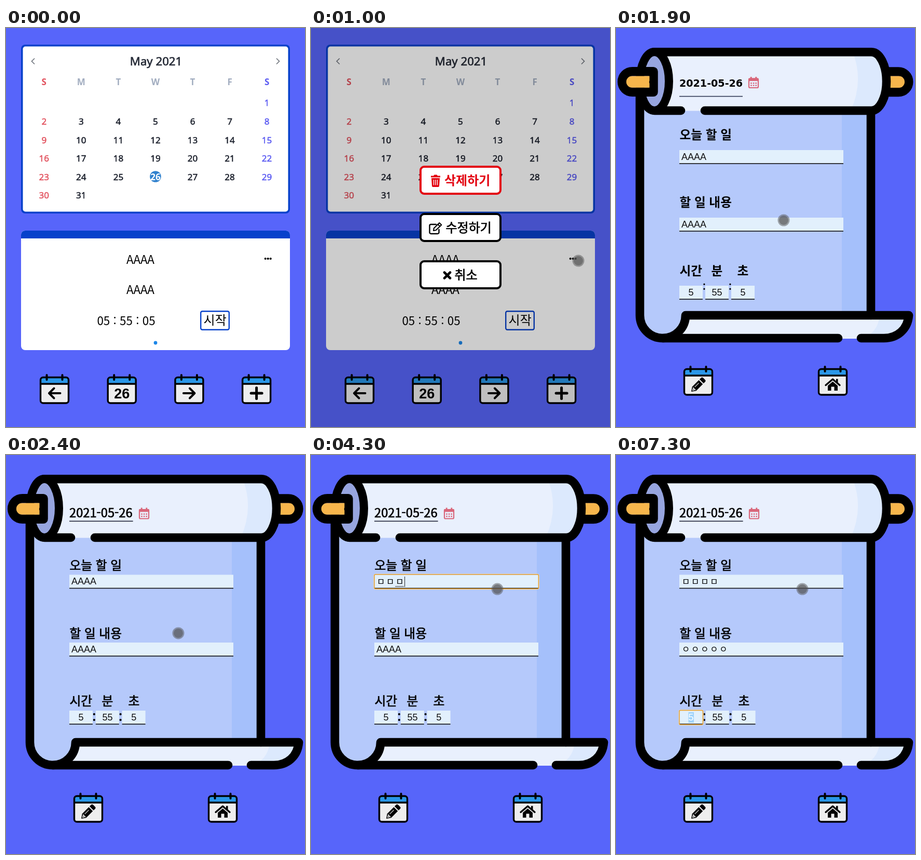
Animation, 576 px wide and 768 px high, one loop 8000 ms. Source, as an HTML page:

```html
<!DOCTYPE html>
<html lang="ko">
<head>
<meta charset="utf-8">
<title>Planner</title>
<style>
  html, body { margin: 0; width: 100%; height: 100%; overflow: hidden; background: #5765fa; }
  svg { display: block; width: 100vw; height: 100vh; }
  text { white-space: pre; }
  .cjk, .jamo { font-family: "Noto Sans CJK KR", "Noto Sans KR", "Noto Sans CJK JP", sans-serif; }
  .jamo { letter-spacing: 2.8px; }
  .cal { font-family: "Noto Sans", "Open Sans", sans-serif; }
  .input { font-family: "Liberation Sans", Arial, sans-serif; }
  .dejavu { font-family: "DejaVu Sans", sans-serif; }
</style>
</head>
<body>
<svg id="stage" viewBox="0 0 576 768">
  <g id="home"></g>
  <g id="modal"></g>
  <g id="edit">
    <g id="scroll"></g>
    <g id="form"></g>
  </g>
  <g id="pointer">
    <circle r="11.5" fill="#555" fill-opacity=".5"/>
    <circle r="9" fill="#505050" fill-opacity=".5"/>
  </g>
  <g id="mover">
    <path d="M-4 0H4M0 -4V4" stroke="#fff" stroke-width="5"/>
    <path d="M0 -8l3.5 4h-7zM0 8l3.5 -4h-7zM-8 0l4 -3.5v7zM8 0l-4 -3.5v7z" stroke="#fff" stroke-width="1.6" paint-order="stroke"/>
    <path d="M-5 0H5M0 -5V5" stroke="#000" stroke-width="2"/>
  </g>
</svg>
<script>
const LOOP = 8000;
const BLUE = '#0741cb';
const $ = id => document.getElementById(id);

// Medium weight is regular thickened by a fine outline.
const text = (s, x, y, size, { fill = '#000', weight = 400, font = 'cjk', anchor = 'start' } = {}) => {
  const medium = weight === 500;
  const outline = medium ? `stroke="${fill}" stroke-width="${size * 0.03}"` : '';
  return `<text class="${font}" x="${x}" y="${y}" font-size="${size}" font-weight="${medium ? 400 : weight}" fill="${fill}" text-anchor="${anchor}" ${outline}>${s}</text>`;
};
const rect = (x, y, w, h, fill, rx = 0, more = '') =>
  `<rect x="${x}" y="${y}" width="${w}" height="${h}" rx="${rx}" fill="${fill}" ${more}/>`;
const line = (d, width, color = '#000', more = '') =>
  `<path d="${d}" fill="none" stroke="${color}" stroke-width="${width}" ${more}/>`;
const shape = (d, fill) => `<path d="${d}" fill="${fill}"/>`;
const dot = (x, y, r, fill) => `<circle cx="${x}" cy="${y}" r="${r}" fill="${fill}"/>`;
const round = 'stroke-linecap="round" stroke-linejoin="round"';

// Calendar-shaped button; (0,0) is the top centre.
const calendarButton = (x, y, symbol) => `<g transform="translate(${x} ${y})">
  ${rect(-27, 6.5, 54, 49.5, '#eee', 5)}
  ${shape('M-27 19V11a5 5 0 0 1 5 -5H22a5 5 0 0 1 5 5V19z', '#2a97e8')}
  ${line('M-27 19H27', 3.4)}
  ${rect(-27, 6.5, 54, 49.5, 'none', 5, 'stroke="#000" stroke-width="3.4"')}
  ${line('M-15 2V11M15 2V11', 4, '#000', 'stroke-linecap="round"')}
  ${symbol}</g>`;

const icons = {
  left: line('M11 37H-10M-1 27.5L-10.5 37L-1 46.5', 4, '#000', round),
  right: line('M-11 37H10M1 27.5L10.5 37L1 46.5', 4, '#000', round),
  plus: line('M-10.5 37H10.5M0 26.5V47.5', 5, '#000', round),
  today: text('26', 0, 47, 27, { weight: 700, font: 'input', anchor: 'middle' }),
  pencil: `<g transform="translate(-13.5 50) rotate(-45)">
    ${shape('M0 0L8 -5.5H26V5.5H8z', '#000')}${shape('M28 -5.5H32a3 3 0 0 1 3 3V2.5a3 3 0 0 1 -3 3H28z', '#000')}
    ${line('M11 -1.5H22', 1.2, '#eee')}${line('M4 0L8 -2.4V2.4z', 1.5, '#eee')}</g>`,
  house: line('M-13.5 37.5L0 26L13.5 37.5', 3.4, '#000', round) +
    shape('M0 30.5L9.5 38.5V48H3V40.5H-3V48H-9.5V38.5z', '#000') + rect(6.5, 25.5, 3.5, 8, '#000')
};

function drawHome() {
  const colX = col => 73.3 + col * 71.55;
  const colColor = (col, plain) => col === 0 ? '#e2525e' : col === 6 ? '#5c5cf2' : plain;
  let out = rect(0, 0, 576, 768, '#5765fa') +
    rect(29, 32, 518, 325, BLUE, 8) + rect(32.5, 35.5, 511, 318, '#fff', 5) +
    line('M55 58.5L49.5 64L55 69.5M521 58.5L526.5 64L521 69.5', 1.7, '#70757d') +
    text('May 2021', 289, 72, 22.2, { fill: '#252a36', weight: 500, font: 'cal', anchor: 'middle' });

  [...'SMTWTFS'].forEach((name, col) => {
    out += text(name, colX(col), 109.7, 17, { fill: colColor(col, '#a2adc0'), weight: 700, font: 'cal', anchor: 'middle' });
  });
  for (let day = 1; day <= 31; day++) {
    const col = (day + 5) % 7, row = Math.floor((day + 5) / 7);
    const y = 150.4 + row * 35.55, today = day === 26;
    if (today) out += dot(colX(col), 286, 10.8, '#3182ce');
    out += text(day, colX(col), y, 17, {
      fill: today ? '#fff' : colColor(col, '#1a1f2b'), weight: today ? 700 : 500, font: 'cal', anchor: 'middle'
    });
  }

  out += rect(29, 390, 518, 230, '#fff', 8) +
    shape('M29 405V398a8 8 0 0 1 8 -8H539a8 8 0 0 1 8 8V405z', BLUE) +
    [454, 512].map(y => text('AAAA', 259, y, 22.4, { anchor: 'middle' })).join('') +
    text('05 : 55 : 05', 231.5, 572, 22.4, { anchor: 'middle' }) +
    rect(375.2, 545.2, 54.6, 35.6, 'none', 3, `stroke="${BLUE}" stroke-width="2.4"`) +
    text('시작', 402.7, 571, 24, { anchor: 'middle' }) +
    [499.7, 504.7, 509.7].map(x => dot(x, 444, 2.1, '#000')).join('') +
    dot(288, 606, 3.4, '#1c86e8');
  ['left', 'today', 'right', 'plus'].forEach((name, i) => {
    out += calendarButton(93.5 + i * 129.7, 666, icons[name]);
  });
  return out;
}

function drawModal() {
  const button = (y, color, icon, label, x, weight) =>
    rect(211, y + 2, 154, 52, '#fff', 7, `stroke="${color}" stroke-width="4"`) + icon +
    text(label, x, y + 37.3, 24, { fill: color, weight });
  const trash = shape('M231 284.5h5l1.5 -2h5l1.5 2h5v3h-18zM232 289h16l-1 15a2 2 0 0 1 -2 2h-10a2 2 0 0 1 -2 -2z', '#e3000f') +
    line('M236.5 292V302.5M240 292V302.5M243.5 292V302.5', 1.4, '#fff');
  const pen = line('M241 378H231a2.5 2.5 0 0 0 -2.5 2.5V393.5a2.5 2.5 0 0 0 2.5 2.5H244a2.5 2.5 0 0 0 2.5 -2.5V388', 2.4, '#000', round) +
    line('M236 390L236.7 385.5L247.3 375L251.3 379L240.6 389.3zM244.5 378L248.5 382', 2, '#000', round);
  const cross = line('M257 470.5L268 481.5M268 470.5L257 481.5', 4.6, '#000', 'stroke-linecap="round"');
  return rect(0, 0, 576, 768, '#000', 0, 'fill-opacity=".2"') +
    button(265, '#e3000f', trash, '삭제하기', 257, 700) +
    button(356, '#000', pen, '수정하기', 259.5, 500) +
    button(447, '#000', cross, '취소', 276.5, 500);
}

function drawScroll() {
  const ink = d => line(d, 16.6, '#000', round);
  const pale = '#e9f0fd', shade = '#dce9fd', paper = '#b5c9fb';
  return rect(0, 0, 576, 768, '#5765fa') +
    // sheet
    shape('M46 110H491V553H134A44 44 0 0 1 46 553z', paper) +
    rect(435, 110, 56, 443, '#a5c0fb') +
    // lower curl
    shape('M134 553H564C562 580 542 598 516 598H90Q132 596 134 553z', pale) +
    shape('M508 553H564C562 580 542 598 516 598H470Q504 590 508 553z', shade) +
    ink('M491 150V553') +
    ink('M46 120V553A44 44 0 0 0 134 553H564C562 580 542 597 516 597H472') +
    ink('M90 597H428') +
    // right handle
    line('M515 84H544a19.75 19.75 0 0 1 0 39.5H515', 17.5) +
    rect(500, 92.5, 56, 22.5, '#f7b64c', 11) +
    // roll
    shape('M74 46H492A29 56.5 0 0 1 492 159.5H74z', pale) +
    shape('M456 46H492A29 56.5 0 0 1 492 159.5H452Q478 102 456 46z', shade) +
    ink('M74 46.3H492A29 56.3 0 0 1 492 159H171') +
    ink('M74 159H125') +
    `<ellipse cx="74" cy="102.5" rx="28" ry="56.5" fill="#97a5df" stroke="#000" stroke-width="16"/>` +
    // left handle
    line('M31.5 83.7H72V123.3H31.5a19.8 19.8 0 0 1 0 -39.6z', 17.5, '#000', 'stroke-linejoin="round"') +
    shape('M31 92.4H64.5V101Q63 104 64.5 107V114.8H31a11.2 11.2 0 0 1 0 -22.4z', '#f7b64c') +
    calendarButton(158.5, 650, icons.pencil) + calendarButton(417.5, 650, icons.house);
}

const dateIcon = (x, y) => `<g transform="translate(${x} ${y})">
  ${rect(-9, -7.5, 18, 17.5, 'none', 2, 'stroke="#d9667a" stroke-width="2.2"')}
  ${rect(-10, -8.5, 20, 5.5, '#d9667a', 2)}
  ${line('M-4.8 -11V-7M4.8 -11V-7', 2.8, '#d9667a')}
  ${[0, 1, 2, 3, 4, 5].map(i => rect(-5.8 + i % 3 * 4.6, 0 + Math.floor(i / 3) * 4.4, 2.6, 2.4, '#d9667a')).join('')}</g>`;

const ring = (x, y, w, h) =>
  rect(x - 1, y - 1, w + 2, h + 2, 'none', 3, 'stroke="#f6e3bd" stroke-width="1"') +
  rect(x, y, w, h, 'none', 2, 'stroke="#e39d2c" stroke-width="1.5"');

const box = (x, y, w) => rect(x, y, w, 26, '#e2f0fc') + rect(x, y + 25.2, w, 1.6, '#111');

function wideField(y, { typed, jamo, selected, focused, composing, caret }) {
  let out = box(122, y, 316);
  if (selected) out += rect(126, y + 3, 48, 20, '#9fd3fb');
  out += typed
    ? text(jamo.repeat(typed), 127, y + 19.3, 16.6, { font: 'jamo' })
    : text('AAAA', 126, y + 18.7, 18, { font: 'input', fill: selected ? '#fff' : '#111' });
  const end = 126 + (typed || 0) * 18.03;
  if (composing) out += rect(end - 18, y + 22, 17, 1, '#333');
  if (caret) out += rect(end, y + 3.5, 1, 20, '#222');
  if (focused) out += ring(122, y - 0.4, 316.4, 27.4);
  return out;
}

function drawForm(t) {
  const ready = t >= 2000;   // web font arrives and the layout settles
  const weight = ready ? 500 : 700;
  const pick = (before, after) => ready ? after : before;
  const label = (s, x, before, after) => text(s, x, pick(before, after), 23.7, { weight });
  const typedCount = times => times.filter(at => t >= at).length;
  const first = typedCount([3800, 4000, 4200, 4400]);
  const second = typedCount([5100, 5400, 5500, 5700, 5900]);
  const focus = t < 3000 ? 0 : t < 4800 ? 1 : t < 6200 ? 2 : 3;

  let out = ready
    ? text('2021-05-26', 122, 120, 23.7, { weight: 500 }) + rect(122, 126.6, 122.6, 1.6, '#1c2133')
    : text('2021-05-26', 122, 112.5, 19.1, { weight: 700, font: 'dejavu' }) + rect(122, 130.8, 122, 1.6, '#2f3753');
  out += dateIcon(pick(265, 266), pick(105, 112.5)) +
    label('오늘 할 일', 122.5, 213.5, 221.3) +
    wideField(pick(235, 230.5), {
      typed: first, jamo: 'ㅁ', focused: focus === 1, selected: !first && t >= 3600,
      composing: focus === 1 && first, caret: focus === 1 && first
    }) +
    label('할 일 내용', 122.5, 343.5, 351.8) +
    wideField(pick(365, 361), {
      typed: second, jamo: 'ㅇ', focused: focus === 2, selected: !second && focus === 2,
      composing: focus === 2 && second, caret: focus === 2 && second
    }) +
    label('시간', 122.5, 475.5, 482.3) +
    label('분', pick(183.5, 184.5), 475.5, 482.3) +
    label('초', pick(233.5, 235.5), 475.5, 482.3);

  const y = pick(496, 492), step = pick(50, 50.8);
  ['5', '55', '5'].forEach((value, i) => {
    const x = 122 + i * step, selected = focus === 3 && i === 0;
    out += box(x, y, 45);
    if (selected) out += rect(139.5, y + 3, 10.5, 20, '#9fd3fb');
    out += text(value, x + 22.6, y + 19, 18, { font: 'input', anchor: 'middle', fill: selected ? '#fff' : '#111' });
    if (i < 2) out += text(':', x + 47.9, pick(505, 513), pick(18, 22), { weight: 700, anchor: 'middle' });
  });
  if (focus === 3) out += ring(122, y - 0.4, 45.4, 27.4);
  return out;
}

// Pointer keyframes: time, x, y
const track = [[500, 540, 470], [900, 515, 448], [1200, 515, 448], [1700, 320, 391],
  [1800, 320, 390], [1900, 323, 370], [2300, 330, 350], [2900, 356, 255], [3600, 356, 255], [3700, 359, 258]];

function pointerAt(t) {
  const next = track.findIndex(k => k[0] > t);
  if (next < 0) return track[track.length - 1].slice(1);
  if (next === 0) return track[0].slice(1);
  const [a, b] = [track[next - 1], track[next]];
  const p = (t - a[0]) / (b[0] - a[0]), eased = p * p * (3 - 2 * p);
  return [1, 2].map(i => a[i] + (b[i] - a[i]) * eased);
}

const show = (id, on) => $(id).setAttribute('display', on ? 'inline' : 'none');
let lastForm = '';

function update(t) {
  t = Math.floor(t / 100) * 100;
  const editing = t >= 1900, moving = t >= 2800 && t < 3700;
  show('home', !editing);
  show('modal', t >= 1000 && !editing);
  show('edit', editing);
  show('pointer', t >= 500 && !moving);
  show('mover', moving);
  const at = `translate(${pointerAt(t).join(' ')})`;
  $('pointer').setAttribute('transform', at);
  $('mover').setAttribute('transform', at);
  if (!editing) return;
  const form = drawForm(t);
  if (form !== lastForm) $('form').innerHTML = lastForm = form;
}

$('home').innerHTML = drawHome();
$('modal').innerHTML = drawModal();
$('scroll').innerHTML = drawScroll();

const start = performance.now();
function tick() {
  update((performance.now() - start) % LOOP);
  requestAnimationFrame(tick);
}
tick();
</script>
</body>
</html>
```
